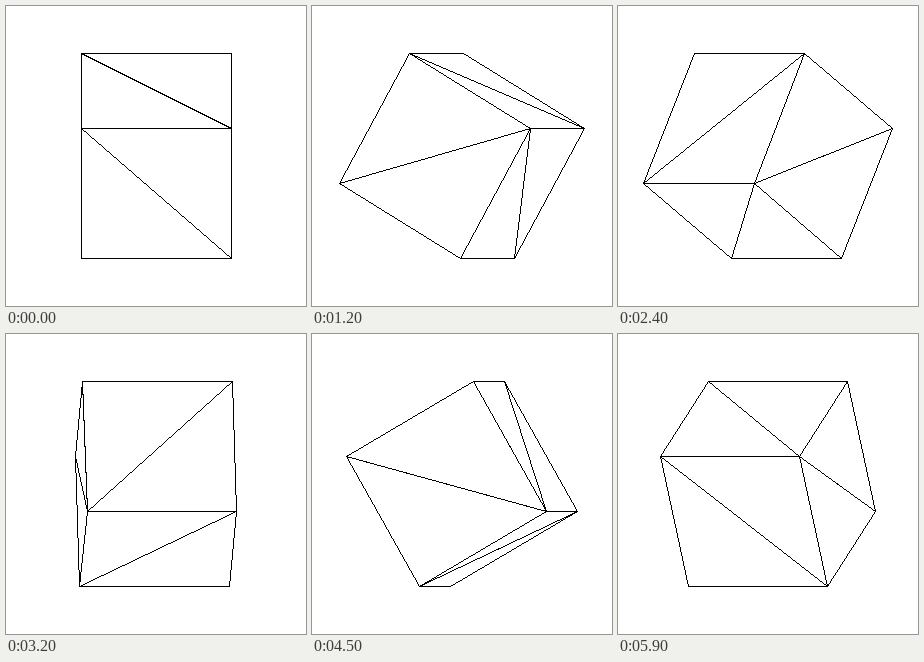
These frames come from a looping animation (300x300 px, 6000 ms). An HTML page with a canvas:

```html
<!DOCTYPE html>
<html lang="en">
<head>
<meta charset="utf-8">
<title>Rotating wireframe cube</title>
<style>
  html, body { margin: 0; width: 100%; height: 100%; overflow: hidden; background: #fff; }
  canvas { display: block; width: 300px; height: 300px; image-rendering: pixelated; }
</style>
</head>
<body>
<canvas id="stage" width="300" height="300"></canvas>
<script>
const ctx = document.getElementById('stage').getContext('2d');
const CENTER = 150, HALF = 75, TILT = Math.PI / 6;
const STEP_MS = 100, STEPS = 60, RAD_PER_STEP = 0.1;

// Corner names: front/back, top/bottom, left/right.
const corners = {};
for (const depth of 'fb') for (const level of 'tb') for (const side of 'lr') {
  const x = side === 'l' ? -HALF : HALF;
  const y = level === 't' ? -HALF : HALF;
  const z = depth === 'f' ? HALF : -HALF;
  corners[depth + level + side] = {
    x,
    y: y * Math.cos(TILT) + z * Math.sin(TILT),
    z: z * Math.cos(TILT) - y * Math.sin(TILT)
  };
}

// Clockwise from outside; each face is split from its first to its third corner.
const faces = [
  'ftl ftr fbr fbl', 'btl btr ftr ftl', 'ftl fbl bbl btl',
  'ftr btr bbr fbr', 'btl bbl bbr btr', 'fbr bbr bbl fbl'
].map(face => face.split(' '));

function project({ x, y, z }, angle) {
  return [CENTER + x * Math.cos(angle) + z * Math.sin(angle), CENTER + y];
}

// Bresenham line, so that strokes stay crisp and one pixel wide.
function line(from, to) {
  let [x, y] = from.map(Math.floor);
  const [endX, endY] = to.map(Math.floor);
  const dx = Math.abs(endX - x), dy = Math.abs(endY - y);
  const sx = Math.sign(endX - x), sy = Math.sign(endY - y);
  let err = dx - dy;
  for (;;) {
    ctx.fillRect(x, y, 1, 1);
    if (x === endX && y === endY) return;
    const twice = 2 * err;
    if (twice > -dy) { err -= dy; x += sx; }
    if (twice < dx) { err += dx; y += sy; }
  }
}

function triangle(a, b, c) {
  line(a, b);
  line(b, c);
  line(c, a);
}

const facesViewer = (a, b, c) =>
  (b[0] - a[0]) * (c[1] - a[1]) - (b[1] - a[1]) * (c[0] - a[0]) > 0;

function draw(angle) {
  ctx.fillStyle = '#fff';
  ctx.fillRect(0, 0, 300, 300);
  ctx.fillStyle = '#000';
  for (const face of faces) {
    const [a, b, c, d] = face.map(name => project(corners[name], angle));
    if (!facesViewer(a, b, c)) continue;
    triangle(a, b, c);
    triangle(a, c, d);
  }
}

function tick() {
  const step = Math.floor(performance.now() / STEP_MS) % STEPS;
  draw(step * RAD_PER_STEP);
  requestAnimationFrame(tick);
}
tick();
</script>
</body>
</html>
```
